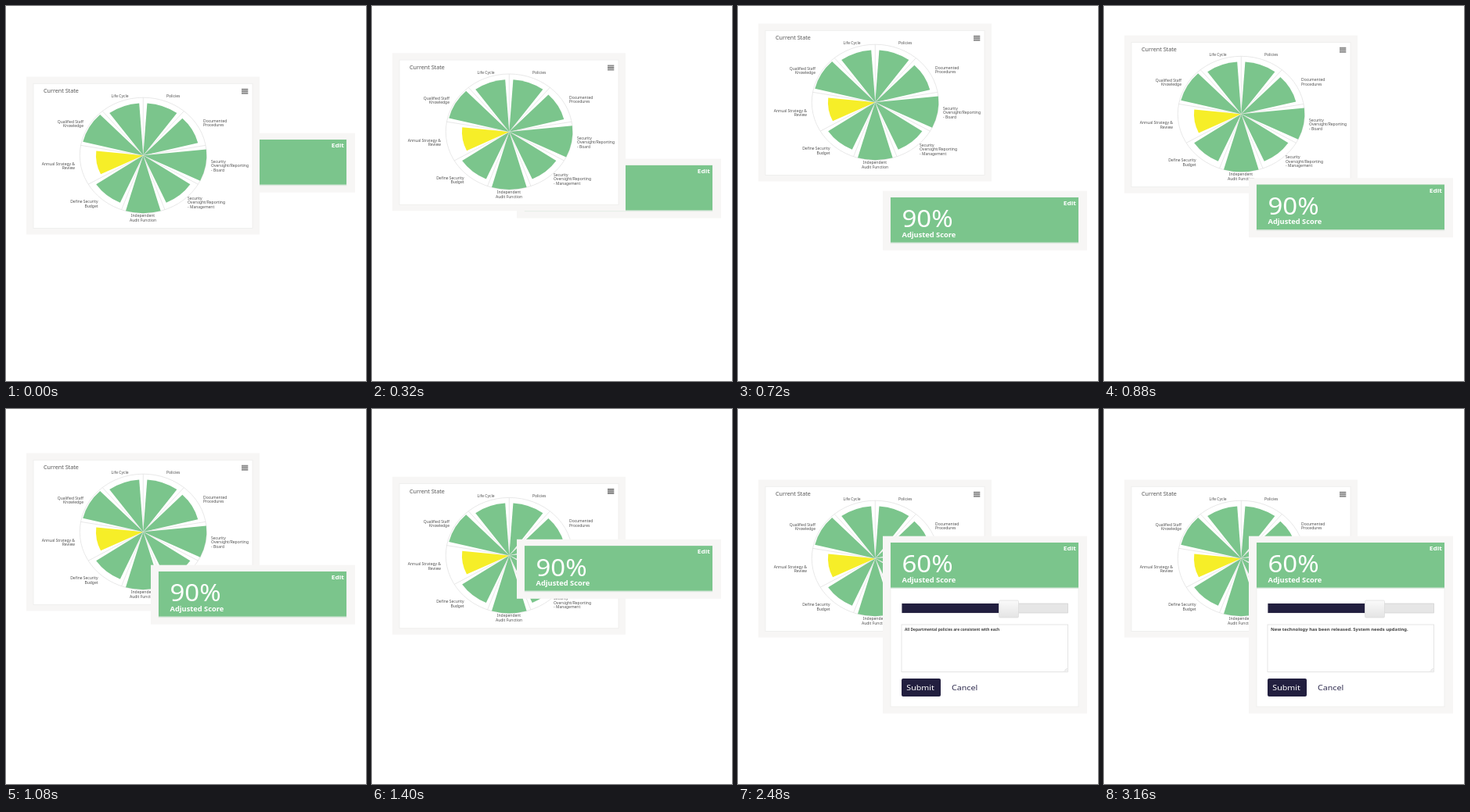
An HTML page for the animation above (3240 ms loop, 460 by 480 pixels).

```html
<!DOCTYPE html>
<html lang="en">
<head>
<meta charset="utf-8">
<title>Score review</title>
<style>
  html, body { margin: 0; width: 100%; height: 100%; overflow: hidden; background: #fff; }
  svg { display: block; width: 460px; height: 480px; font-family: "Noto Sans", "Open Sans", sans-serif; }
  /* The whole scene is slightly flattened; text shrinks towards its baseline. */
  text { transform: scaleY(.914); transform-box: fill-box; transform-origin: 0 78.5%; }
  .frame { fill: #f7f6f5; }
  .sheet { fill: #fff; stroke: #ededec; stroke-width: .8; }
  .green { fill: #7bc58c; }
  .navy { fill: #221f3f; }
  .grid { fill: none; stroke: #dedede; stroke-width: .7; }
  .label { font-size: 5px; fill: #505050; }
  .white { fill: #fff; }
  .bold { font-weight: 700; }
  .button { font-size: 10.7px; font-weight: 500; }
  .box { fill: #fff; stroke: #dedede; stroke-width: .8; }
</style>
</head>
<body>
<svg id="stage" viewBox="0 0 460 480">
  <defs>
    <clipPath id="clip"><rect id="window" x="194" y="170" width="242"/></clipPath>
    <linearGradient id="knobFill" x2="0" y2="1">
      <stop stop-color="#fafafa"/><stop offset="1" stop-color="#e4e4e4"/>
    </linearGradient>
  </defs>

  <g id="chart">
    <rect class="frame" x="26" y="90.5" width="298" height="202"/>
    <rect class="sheet" x="35" y="99.3" width="280" height="185.2"/>
    <text x="48" y="111.3" font-size="7.2" font-weight="500" fill="#555">Current State</text>
    <path d="M301 106.7h8.3M301 109.2h8.3M301 111.7h8.3" stroke="#8c8c8c" stroke-width="2.1"/>
    <g id="pie"></g>
  </g>

  <g id="panel">
    <rect class="frame" id="outer" x="185" y="162.7" width="261"/>
    <rect class="sheet" id="inner" x="195" y="171" width="240"/>
    <g clip-path="url(#clip)">
      <rect x="209.5" y="249" width="212" height="12" fill="#e6e6e6" stroke="#cfcfcf" stroke-width=".7"/>
      <rect class="navy" id="fill" x="209.5" y="249" height="12"/>
      <rect id="knob" y="245" width="25" height="22" rx="1.5" fill="url(#knobFill)" stroke="#dadada" stroke-width=".7"/>
      <rect class="box" x="209" y="276" width="212.5" height="60.5"/>
      <path d="M417 335.5l3.5-3.5M419 335.5l1.5-1.5" stroke="#bbb" stroke-width=".6"/>
      <text id="note" x="213" y="283.7" font-weight="600" fill="#444"></text>
      <rect class="navy" x="209" y="345" width="50" height="23" rx="2"/>
      <text class="button white" x="215.3" y="360">Submit</text>
      <text class="button" x="273" y="360" fill="#302d50">Cancel</text>
    </g>
    <rect x="195" y="228" width="240" height="1.8" fill="#d5e6d9"/>
    <rect class="green" x="195" y="171" width="240" height="57.5"/>
    <text class="white" id="score" x="209.5" y="209.5" font-size="33"></text>
    <text class="white bold" x="209.5" y="221.5" font-size="9.3">Adjusted Score</text>
    <text class="white bold" x="432" y="181.2" font-size="8.4" text-anchor="end">Edit</text>
  </g>
</svg>

<script>
const $ = id => document.getElementById(id);
const set = (node, attrs) => {
  for (const key in attrs) node.setAttribute(key, attrs[key]);
  return node;
};
const add = (parent, tag, attrs) =>
  parent.appendChild(set(document.createElementNS("http://www.w3.org/2000/svg", tag), attrs));
const ramp = (t, from, to) => Math.min(1, Math.max(0, (t - from) / (to - from)));

const CX = 175.3, CY = 191.2, RX = 81, RY = 74;

// Point on the flattened pie, degrees clockwise from the top.
const point = (deg, r) => {
  const a = deg * Math.PI / 180;
  return `${CX + RX * r * Math.sin(a)} ${CY - RY * r * Math.cos(a)}`;
};

// Radius, label x, first baseline, anchor, lines
const sectors = [
  [.905, 205, 116.8, "start", "Policies"],
  [.89, 252, 149, "start", "Documented", "Procedures"],
  [1, 262, 200.8, "start", "Security", "Oversight/Reporting", "- Board"],
  [.895, 232, 248, "start", "Security", "Oversight/Reporting", "- Management"],
  [1, 175, 270.3, "middle", "Independent", "Audit Function"],
  [.895, 117.5, 252.2, "end", "Define Security", "Budget"],
  [.745, 88, 204, "end", "Annual Strategy &", "Review"],
  [.98, 99, 149.8, "end", "Qualified Staff", "Knowledge"],
  [.905, 156.5, 116.8, "end", "Life Cycle"]
];

const pie = $("pie");
add(pie, "ellipse", { class: "grid", cx: CX, cy: CY, rx: RX, ry: RY });
sectors.forEach(([r, x, y, anchor, ...lines], i) => {
  const deg = i * 40;
  add(pie, "path", { class: "grid", d: `M${CX} ${CY}L${point(deg, 1)}` });
  add(pie, "path", {
    fill: i === 6 ? "#f6ee28" : "#7bc58c",
    d: `M${CX} ${CY}L${point(deg + 4, r)}A${RX * r} ${RY * r} 0 0 1 ${point(deg + 36, r)}Z`
  });
  lines.forEach((line, n) => {
    add(pie, "text", { class: "label", x, y: y + n * 5.5, "text-anchor": anchor }).textContent = line;
  });
});

const LOOP = 3240, STEP = 40, SWAP = 720, CHARS = 7;
const oldNote = "All Departmental policies are consistent with each other.";
const newNote = "New technology has been released. System needs updating.";

function draw(t) {
  // The cards part, swap order at the widest point and come back.
  const apart = Math.max(0, 1 - Math.abs(t - SWAP) / SWAP);
  set($("chart"), { transform: `translate(0 ${-68 * apart})` });
  set($("panel"), { transform: `translate(0 ${74 * apart})` });
  $("stage").append(...(t < SWAP ? [$("panel"), $("chart")] : [$("chart"), $("panel")]));

  const height = 59 + 151 * ramp(t, 1680, 1960);
  set($("inner"), { height });
  set($("outer"), { height: height + 17 });
  set($("window"), { height });

  const score = Math.round(90 - 30 * ramp(t, 2000, 2400));
  const knobX = 346 + (score - 60) * 2 - 12.5;
  $("score").textContent = score + "%";
  set($("knob"), { x: knobX });
  set($("fill"), { width: knobX - 209.5 });

  const typing = t > 2840;
  const count = typing
    ? (t - 2840) / STEP * CHARS
    : oldNote.length - Math.max(0, t - 2440) / STEP * CHARS;
  $("note").textContent = (typing ? newNote : oldNote).slice(0, Math.max(0, count));
  set($("note"), { "font-size": typing ? 5.9 : 4.85 });
}

const start = performance.now();
function tick() {
  const t = (performance.now() - start) % LOOP;
  draw(Math.floor(t / STEP) * STEP);
  requestAnimationFrame(tick);
}
tick();
</script>
</body>
</html>
```
